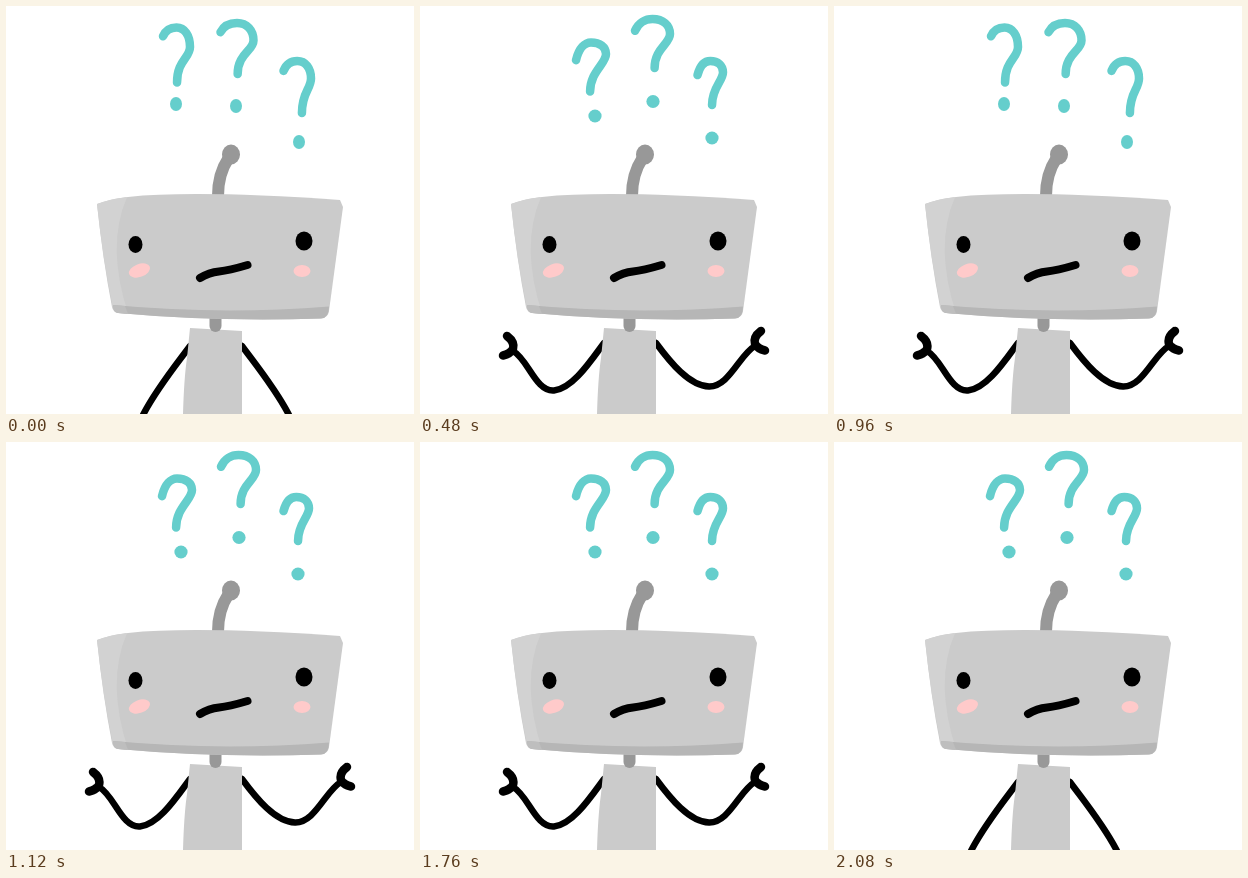
Write an HTML page that moves like this. It is 408x408 px and loops after 2.16 s.

```html
<!DOCTYPE html>
<html lang="en">
<head>
<meta charset="utf-8">
<title>Puzzled robot</title>
<style>
  html, body { margin: 0; width: 100%; height: 100%; overflow: hidden; background: #fff; }
  svg { display: block; width: 100vw; height: 100vh; }
  .line { fill: none; stroke: #000; stroke-linecap: round; stroke-linejoin: round; }
  .mark { stroke: #65cecc; stroke-width: 8.5; }
  .dot { fill: #65cecc; }
  .limb { stroke-width: 6.5; }
  .palm { stroke-width: 8.5; }
  .metal { fill: #cbcbcb; }
  .joint { stroke: #989898; stroke-width: 12; }
  .blush { fill: #ffcaca; }
</style>
</head>
<body>
<svg viewBox="0 0 408 408">
  <g id="marks"></g>
  <g id="arms"></g>

  <path class="metal" d="M184 322L236 325V408H177Q178 372 181 352Z"/>
  <path class="line joint" d="M209.500 308V320"/>
  <path class="line joint" d="M212 190Q212 168 222 153"/>
  <ellipse fill="#989898" cx="225" cy="148.500" rx="9" ry="10"/>

  <path class="metal" d="M91 198Q104 193 122 191Q190 184 334 194L337 201L323 305Q322 312 315 312.500Q210 316 112 307Q107 306 106 301Q97 255 91 198Z"/>
  <path fill="#d2d2d2" d="M91 198Q104 193 121 191Q100 240 122 307L107 302Q97 255 91 198Z"/>
  <path fill="#b6b6b6" d="M107 299Q215 309 323 300.500Q323 312 315 312.500Q210 316 112 307Q107 306 107 299Z"/>
  <path fill="#bebebe" d="M107 299L119 300L122 308L112 307Q107 306 107 299Z"/>

  <ellipse cx="129.500" cy="238.500" rx="7" ry="8.500"/>
  <ellipse cx="298" cy="235" rx="8.500" ry="9.500"/>
  <ellipse class="blush" cx="133.500" cy="264.500" rx="11" ry="6.500" transform="rotate(-20 133.500 264.500)"/>
  <ellipse class="blush" cx="296" cy="265" rx="8.500" ry="6"/>
  <path class="line" stroke-width="8" d="M194 272Q203 266.500 213 265.500T241.500 259"/>
</svg>
<script>
  const STEP = 80, COUNT = 27, CYCLE = 4;

  // Poses: left, top, width, height, tilt, tail position, dot x, dot y.
  const marks = [
    { from: [157, 21.5, 27, 55, .16, .52, 170, 98], to: [156, 36.5, 30, 49, .36, .47, 175, 110], bob: 0 },
    { from: [214.5, 17, 33, 51, .18, .52, 230, 100], to: [215, 13, 35, 49, .24, .56, 233, 95.5], bob: 4 },
    { from: [277.5, 55, 27.5, 52, .19, .67, 293, 136], to: [277.5, 55, 25.5, 44, .32, .57, 292, 132], bob: 3.5 }
  ];

  // Joints: shoulder, elbow, wrist.
  const arms = [
    { side: -1, up: [184, 337, 134, 384.5, 93, 345], down: [184, 340, 137.5, 408, 116, 470] },
    { side: 1, up: [236, 337, 289, 380.5, 335, 340], down: [236, 340, 282.5, 408, 304, 470] }
  ];

  const mix = (a, b, k) => a.map((v, i) => v + (b[i] - v) * k);
  const set = (el, attrs) => {
    for (const name in attrs) el.setAttribute(name, attrs[name]);
    return el;
  };
  const add = (parent, tag, attrs) => document.getElementById(parent).appendChild(
    set(document.createElementNS("http://www.w3.org/2000/svg", tag), attrs));

  for (const mark of marks) {
    mark.hook = add("marks", "path", { class: "line mark" });
    mark.dot = add("marks", "ellipse", { class: "dot" });
  }
  for (const arm of arms) {
    arm.limb = add("arms", "path", { class: "line limb" });
    arm.palm = add("arms", "path", { class: "line palm", d: "M6 -15Q-2 -9 0 -2Q3 3 10 4.500" });
  }

  function poseMark(mark, phase) {
    const k = (1 - Math.cos(phase)) / 2;
    const [x, y, w, h, tilt, tail, cx, cy] = mix(mark.from, mark.to, k);
    const at = (u, v) => `${x + u * w} ${y + v * h} `;
    const side = .45 - .6 * tilt;
    set(mark.hook, {
      d: "M" + at(0, tilt) +
        "C" + at(.1, tilt * .3) + at(.3, 0) + at(.5, 0) +
        "C" + at(.8, 0) + at(1, side * .4) + at(1, side) +
        "C" + at(1, side + .2) + at(tail, .6) + at(tail, 1),
      transform: `translate(0 ${-mark.bob * Math.sin(phase)})`
    });
    set(mark.dot, {
      cx, cy, rx: 6 + k * .6, ry: 7 - k * .6,
      transform: mark.hook.getAttribute("transform")
    });
  }

  function poseArm({ side, up, down, limb, palm }, lift) {
    const [sx, sy, ex, ey, wx, wy] = mix(down, up, lift);
    const tx = (wx - sx) * .2, ty = (wy - sy) * .2;
    set(limb, {
      d: `M${sx} ${sy}C${sx + side * 14} ${sy + 19} ${ex - tx} ${ey - ty} ${ex} ${ey}` +
        `C${ex + tx} ${ey + ty} ${wx - side * 15} ${wy + 8} ${wx} ${wy}`
    });
    set(palm, { transform: `translate(${wx} ${wy}) scale(${side} 1) rotate(${90 * (1 - lift)})` });
  }

  function draw(frame) {
    const phase = frame % CYCLE / CYCLE * 2 * Math.PI;
    const lift = Math.max(0, Math.min(1, (Math.min(frame, COUNT - frame) - 1) / 4));
    marks.forEach(mark => poseMark(mark, phase));
    arms.forEach(arm => poseArm(arm, lift));
  }

  const start = performance.now();
  function tick() {
    draw(Math.floor((performance.now() - start) / STEP) % COUNT);
    requestAnimationFrame(tick);
  }
  tick();
</script>
</body>
</html>
```
